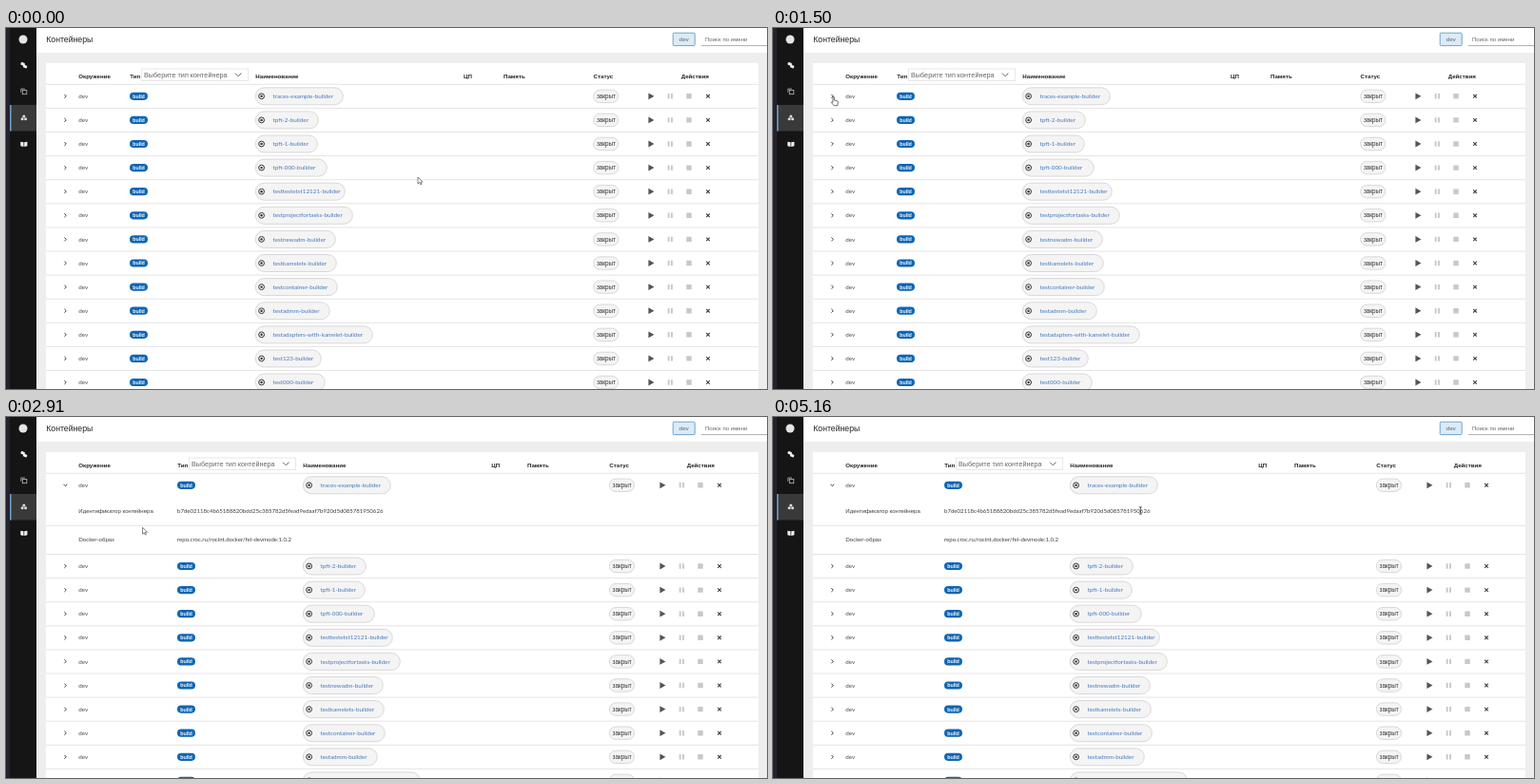
Animation, 800 px wide and 380 px high, one loop 5200 ms. Source, as an HTML page:

```html
<!DOCTYPE html>
<html lang="ru">
<head>
<meta charset="utf-8">
<title>Контейнеры</title>
<style>
html, body { margin: 0; width: 100%; height: 100%; overflow: hidden; background: #eee; }
svg { display: block; width: 800px; height: 380px; }
text { font-family: "Liberation Sans", Arial, sans-serif; font-size: 6.05px; fill: #3d3d3d; white-space: pre; }
.latin { font-family: Lato, sans-serif; }
.name { font-size: 6.3px; fill: #4679bd; }
.env { font-size: 6.3px; fill: #4b4b4b; }
.head { font-size: 6.15px; font-weight: bold; fill: #222; }
.tag { font-size: 5.7px; font-weight: bold; fill: #fff; }
.status { font-size: 6.3px; fill: #333; }
</style>
</head>
<body>
<svg id="stage" viewBox="0 0 800 380" xmlns="http://www.w3.org/2000/svg">
  <rect width="800" height="380" fill="#eee"/>
  <rect x="32" width="768" height="26" fill="#fff"/>
  <rect x="42" y="37" width="749" height="343" fill="#fff"/>
  <text x="42.3" y="15.3" style="font-size:8.7px;fill:#222">Контейнеры</text>
  <rect x="701.2" y="5.2" width="23" height="13.4" rx="1" fill="#dcebf6" stroke="#5f9bcb" stroke-width=".9"/>
  <text class="latin" x="707.6" y="14.2" style="font-size:6.4px;fill:#4f6375">dev</text>
  <text x="735" y="14.2" style="fill:#666">Поиск по имени</text>
  <path d="M731 18.6H800" stroke="#999" stroke-width=".8"/>

  <rect width="4.5" height="380" fill="#24222f"/>
  <rect x="4" width="28" height="380" fill="#151515"/>
  <rect x="4" y="81" width="28" height="27.5" fill="#393939"/>
  <rect x="4" y="81" width="1.6" height="27.5" fill="#6d9cc4"/>
  <circle cx="18" cy="12" r="4.5" fill="#e4e4e4"/>
  <g fill="#eee">
    <rect x="15.4" y="36.4" width="4.4" height="3" rx="1" transform="rotate(25 17.6 38)"/>
    <rect x="18" y="39" width="4.2" height="3" rx="1" transform="rotate(25 20 40.5)"/>
    <path d="M15.3 119.8 18.5 120.3V124.9L15.3 124.3ZM19.2 120.3 22.4 119.8V124.3L19.2 124.9Z"/>
  </g>
  <g fill="none" stroke="#bbb" stroke-width=".8">
    <path d="M15.8 67.8V64H20"/>
    <rect x="17.3" y="65.4" width="4.5" height="4.3"/>
  </g>
  <g fill="#ddd">
    <circle cx="18.8" cy="93" r="1.5"/>
    <circle cx="17.1" cy="95.8" r="1.5"/>
    <circle cx="20.6" cy="95.8" r="1.5"/>
  </g>

  <g id="closed"></g>
  <g id="open"></g>
  <g id="caret"></g>

  <g id="cursor">
    <path id="arrow" d="M0 0V7L1.7 5.5 2.8 7.9 3.9 7.4 2.8 5.1H5Z" fill="#fff" stroke="#444" stroke-width=".65" stroke-linejoin="round"/>
    <path id="hand" d="M1 .7Q1.8 -.2 2.4 .8V4L5.6 4.8Q6.4 5 6.3 6L5.8 9.7H2L-.7 6.3Q-.5 5.2 1 6.2Z" fill="#fff" stroke="#333" stroke-width=".7" stroke-linejoin="round"/>
    <path id="beam" d="M-1.5 -3.6H1.5M-1.5 3.6H1.5M0 -3.6V3.6" fill="none" stroke="#333" stroke-width=".8"/>
  </g>
</svg>
<script>
const LOOP = 5200, EXPAND_AT = 1540, PITCH = 25.1, FIRST_ROW = 71.8;
const byId = id => document.getElementById(id);

// Container name and pill width.
const rows = [
  ['traces-example', 92], ['tpft-2', 66], ['tpft-1', 65], ['tpft-000', 75],
  ['testtestetst12121', 94], ['testprojectfortasks', 102], ['testnewadm', 84],
  ['testkamelets', 85], ['testcontainer', 86], ['testadmm', 78],
  ['testadapters-with-kamelet', 123], ['test123', 69], ['test000', 73]
];
const closedCols = { type: 130, name: 262, cpu: 481, memory: 523, status: 617.3, actions: 709.7, icons: 678 };
const openCols = { type: 180, name: 312, cpu: 510.3, memory: 548, status: 634, actions: 715.7, icons: 690 };

const text = (x, y, content, cls = '') => `<text x="${x}" y="${y}" class="${cls}">${content}</text>`;
const line = y => `<path d="M42 ${y}H791" stroke="#dedede" stroke-width=".8"/>`;
const pill = (x, y, w, h, style) => `<rect x="${x}" y="${y}" width="${w}" height="${h}" rx="${h / 2}" ${style}/>`;
const chipStyle = 'fill="#f4f4f4" stroke="#cacaca" stroke-width=".7"';

function header(c) {
  const labels = [[76.3, 'Окружение'], [c.type + .3, 'Тип'], [c.name + .3, 'Наименование'],
    [c.cpu, 'ЦП'], [c.memory, 'Память'], [c.status + .3, 'Статус'], [c.actions, 'Действия']];
  return labels.map(([x, label]) => text(x, 53, label, 'head')).join('') +
    `<rect x="${c.type + 12.3}" y="43" width="112.4" height="12.6" fill="#fff" stroke="#ddd" stroke-width=".7"/>
     <text x="${c.type + 15}" y="52" style="font-size:7.25px;fill:#666">Выберите тип контейнера</text>
     <path d="M${c.type + 111} 47.6l3.2 3.2 3.2 -3.2" fill="none" stroke="#555" stroke-width=".9"/>`;
}

function icons(x, y) {
  return `<path d="M${x - 2.6} ${y - 3.4}v6.8l6 -3.4z" fill="#555"/>
    <path d="M${x + 17.7} ${y - 2.7}h1.9v5.4h-1.9zM${x + 21} ${y - 2.7}h1.9v5.4h-1.9zM${x + 37.3} ${y - 2.7}h5.4v5.4h-5.4z" fill="#c8c8c8"/>
    <path d="M${x + 58.2} ${y - 1.8}l3.6 3.6m0 -3.6l-3.6 3.6" stroke="#444" stroke-width="1.15"/>`;
}

const chevron = y => `<path d="M61.4 ${y - 1.9}l1.9 1.9 -1.9 1.9" fill="none" stroke="#333" stroke-width=".95"/>`;

function row(c, [name, width], y, hasChevron) {
  const base = y + 2.1;
  return (hasChevron ? chevron(y) : '') +
    text(76.2, base, 'dev', 'latin env') +
    pill(c.type, y - 4.1, 19, 8.2, 'fill="#0f66b5"') +
    text(c.type + 3.3, y + 1.9, 'build', 'latin tag') +
    pill(c.name + .3, y - 9, width, 18, chipStyle) +
    `<circle cx="${c.name + 6.6}" cy="${y}" r="2.9" fill="none" stroke="#333" stroke-width="1"/>
     <circle cx="${c.name + 6.6}" cy="${y}" r="1.2" fill="#333"/>` +
    text(c.name + 18.4, base, name + '-builder', 'latin name') +
    pill(c.status + .3, y - 6.7, 26.2, 13.4, chipStyle) +
    text(c.status + 3.6, base, 'закрыт', 'status') +
    icons(c.icons, y);
}

function details() {
  return text(76.3, 101.2, 'Идентификатор контейнера') +
    text(180, 101.2, 'b7de02118c4b65188820bdd25c385782d5fead9edaaf7b920d5d085781950626', 'latin') +
    line(114.3) +
    text(76.3, 131.3, '<tspan class="latin">Docker-</tspan>образ') +
    text(180, 131.3, 'repo.croc.ru/rocint.docker/fel-devmode:1.0.2', 'latin') +
    line(144.5);
}

function table(c, expanded) {
  const body = rows.map((item, i) => {
    const y = FIRST_ROW + i * PITCH + (expanded && i ? 60.1 : 0);
    const rule = expanded && i === 0 ? '' : line(y + 12.6);
    return rule + row(c, item, y, i > 0);
  }).join('');
  return line(59.3) + header(c) + body + (expanded ? details() : '');
}

byId('closed').innerHTML = table(closedCols, false);
byId('open').innerHTML = table(openCols, true);
byId('caret').innerHTML = chevron(0);

// Pointer stops: time, x, y.
const path = [
  [0, 433, 157], [120, 433, 157], [930, 89, 59], [1120, 62, 72], [1780, 62, 72],
  [2200, 58, 89], [2500, 58, 89], [3450, 272, 157], [3600, 272, 157], [4250, 386.3, 98.5], [LOOP, 386.3, 98.5]
];
const clamp = v => Math.min(1, Math.max(0, v));
const smooth = v => v * v * (3 - 2 * v);

function pointerAt(t) {
  const next = Math.max(1, path.findIndex(p => p[0] > t));
  const [t0, x0, y0] = path[next - 1], [t1, x1, y1] = path[next];
  const k = smooth(clamp((t - t0) / (t1 - t0)));
  return [x0 + (x1 - x0) * k, y0 + (y1 - y0) * k];
}

const show = (id, visible) => byId(id).setAttribute('display', visible ? 'inline' : 'none');

function draw(t) {
  const expanded = t >= EXPAND_AT;
  show('closed', !expanded);
  show('open', expanded);

  const turn = clamp((t - 1590) / 120);
  byId('caret').setAttribute('transform',
    `translate(62.4 ${FIRST_ROW}) rotate(${90 * turn}) translate(-62.4 0)`);
  byId('caret').setAttribute('stroke-width', 1);

  const [x, y] = pointerAt(t);
  const hand = t >= 1070 && t < 1900, beam = t >= 4160;
  byId('cursor').setAttribute('transform', `translate(${x} ${y})`);
  show('hand', hand);
  show('beam', beam);
  show('arrow', !hand && !beam);
}

const start = performance.now();
function tick() {
  draw((performance.now() - start) % LOOP);
  requestAnimationFrame(tick);
}
tick();
</script>
</body>
</html>
```
